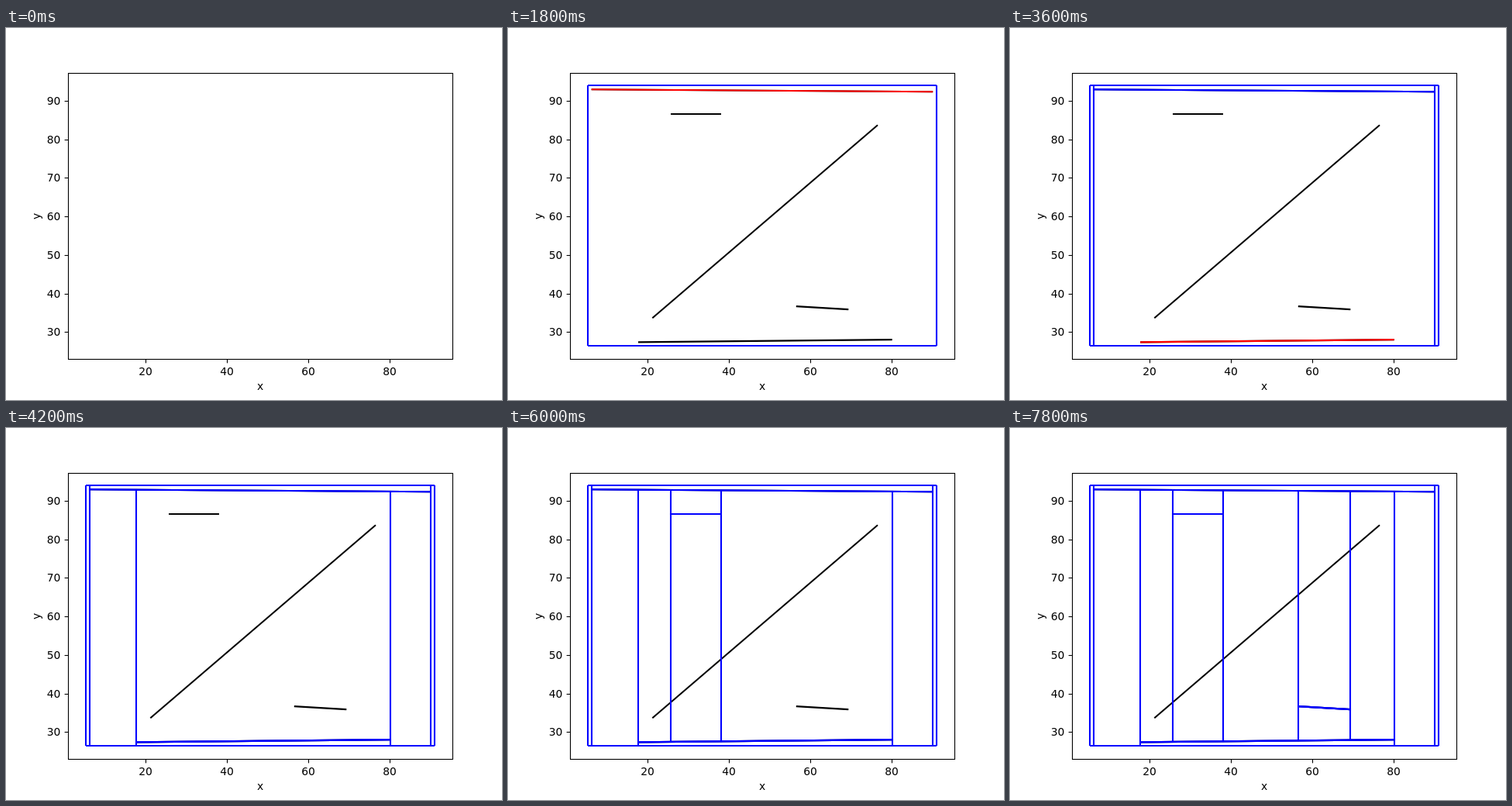
Recreate the animation shown at these times as an HTML page with a canvas. Size 640x480 px, loop 8 s.

```html
<!DOCTYPE html>
<html lang="en">
<head>
<meta charset="utf-8">
<title>Trapezoidal map</title>
<style>
  html, body { margin: 0; width: 100%; height: 100%; overflow: hidden; background: #fff; }
  canvas { display: block; }
</style>
</head>
<body>
<canvas id="stage" width="640" height="480"></canvas>
<script>
const ctx = document.getElementById('stage').getContext('2d');
const STEP = 600, LOOP = 8000;
const BOX = { left: 103, right: 553, top: 74, bottom: 410 };

// Segments in insertion order: x1, y1, x2, y2
const segments = [
  [107.7, 79.3, 548.2, 82.2],
  [168, 405.4, 495.7, 402.1],
  [210, 111, 275, 111],
  [371.8, 359.1, 439.3, 363.1],
  [186.3, 374.2, 477, 125.2],
];
const [roof, floor] = segments;

function line(x1, y1, x2, y2, color, width = 2.08) {
  ctx.strokeStyle = color;
  ctx.lineWidth = width;
  ctx.beginPath();
  ctx.moveTo(x1, y1);
  ctx.lineTo(x2, y2);
  ctx.stroke();
}

function yAt([x1, y1, x2, y2], x) {
  return y1 + (y2 - y1) * (x - x1) / (x2 - x1);
}

function drawAxes() {
  const thin = 1.11;
  ctx.strokeStyle = ctx.fillStyle = '#000';
  ctx.lineWidth = thin;
  ctx.strokeRect(80.5, 58.5, 496, 369);
  ctx.font = '13.89px "DejaVu Sans", sans-serif';

  ctx.textAlign = 'center';
  for (let v = 20; v <= 80; v += 20) {
    const x = Math.round(180 + (v - 20) * 5.25);
    line(x + 0.5, 427.5, x + 0.5, 432.4, '#000', thin);
    ctx.fillText(v, x, 448);
  }
  ctx.fillText('x', 328, 467);

  ctx.textAlign = 'right';
  for (let v = 30; v <= 90; v += 10) {
    const y = Math.round(392.4 - (v - 30) * 4.973);
    line(75.6, y + 0.5, 80.5, y + 0.5, '#000', thin);
    ctx.fillText(v, 70.3, y + 5);
  }

  ctx.save();
  ctx.translate(44, 243);
  ctx.rotate(-Math.PI / 2);
  ctx.textAlign = 'center';
  ctx.fillText('y', 0, 0);
  ctx.restore();
}

function drawBox() {
  const { left, right, top, bottom } = BOX;
  for (const y of [top, bottom]) line(left, y, right, y, 'blue');
  for (const x of [left, right]) line(x, top, x, bottom, 'blue');
}

function drawInserted(index) {
  const seg = segments[index];
  // Shared by the trapezoids above and below
  line(...seg, 'blue');
  line(...seg, 'blue');
  for (const end of [seg[0], seg[2]]) {
    const x = Math.round(end);
    const top = index > 0 ? yAt(roof, x) : BOX.top;
    const bottom = index > 1 ? yAt(floor, x) : BOX.bottom;
    line(x, top, x, bottom, 'blue');
  }
}

function draw(time) {
  const step = Math.floor(time % LOOP / STEP);
  ctx.fillStyle = '#fff';
  ctx.fillRect(0, 0, 640, 480);
  drawAxes();
  if (step >= 1) segments.forEach(seg => line(...seg, '#000'));
  if (step >= 2) drawBox();

  // Each segment takes three steps: red highlight, then two with its trapezoids
  const inserted = Math.floor((step - 1) / 3);
  for (let i = 0; i < inserted; i++) drawInserted(i);
  if (step >= 3 && step % 3 === 0) line(...segments[step / 3 - 1], 'red');
}

const start = performance.now();
function tick() {
  draw(performance.now() - start);
  requestAnimationFrame(tick);
}
tick();
</script>
</body>
</html>
```
